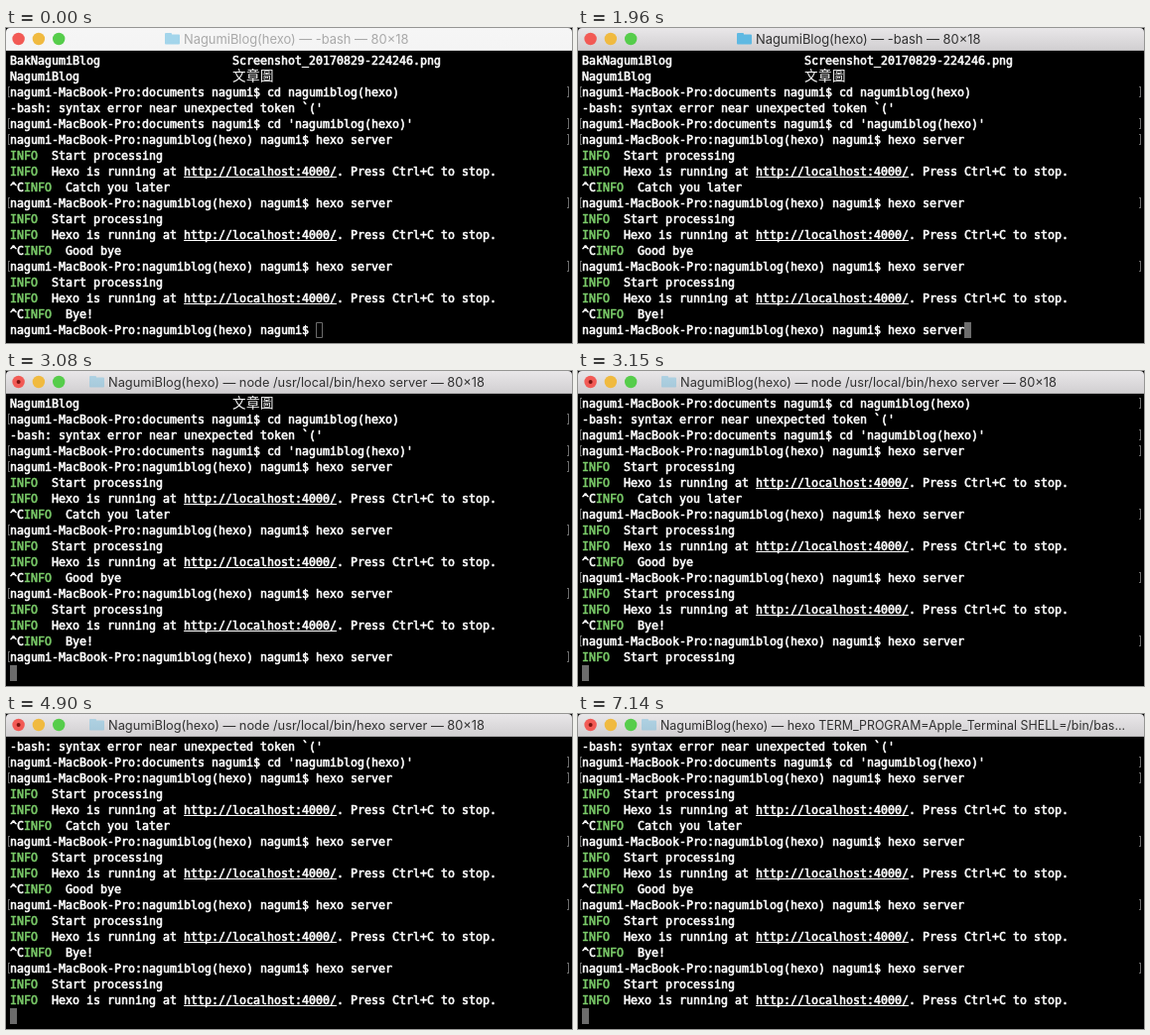
These frames come from a looping animation (570 px wide and 318 px high, 7.28 s). An HTML page with a canvas:

```html
<!DOCTYPE html>
<html lang="en">
<head>
<meta charset="utf-8">
<title>Terminal</title>
<style>
html, body { margin: 0; width: 100%; height: 100%; overflow: hidden; background: #000; }
canvas { display: block; width: 570px; height: 318px; }
</style>
</head>
<body>
<canvas id="stage" width="570" height="318"></canvas>
<script>
const ctx = document.getElementById('stage').getContext('2d');
const LOOP = 7280;
const CELL = 7, ROW = 16, LEFT = 4, TOP = 25, LAST_ROW = 17, BAR = 23;
const WHITE = '#fff', GREEN = '#7acb69', GREY = '#6c6c6c';
const MONO = '11.63px "DejaVu Sans Mono", monospace';
const CJK = '13.5px "Noto Sans CJK TC", "Noto Sans CJK", sans-serif';

// Log entries: prompts carry a path and a command, the rest is plain text
const prompt = (path, command) => ({ prompt: `nagumi-MacBook-Pro:${path} nagumi$ `, command });
const server = () => prompt('nagumiblog(hexo)', 'hexo server');
const start = 'INFO  Start processing';
const running = 'INFO  Hexo is running at http://localhost:4000/. Press Ctrl+C to stop.';
const session = bye => [server(), start, running, '^CINFO  ' + bye];
const log = [
  'BakNagumiBlog'.padEnd(32) + 'Screenshot_20170829-224246.png',
  'NagumiBlog'.padEnd(32) + '文章圖',
  prompt('documents', 'cd nagumiblog(hexo)'),
  "-bash: syntax error near unexpected token `('",
  prompt('documents', "cd 'nagumiblog(hexo)'"),
  ...session('Catch you later'),
  ...session('Good bye'),
  ...session('Bye!'),
  server(), start, running
];

// Timeline in ms; a busy window dims its folder and dots its close button
const FOCUS = 210, COMMAND = 1050;
const SCROLLS = [2030, 3150, 4900];
const folder = 'NagumiBlog(hexo) — ';
const titles = [
  { at: 0, busy: false, icon: 160, size: 12.9, text: folder + '-bash — 80×18' },
  { at: 2170, busy: true, icon: 84, size: 12.8, text: folder + 'node /usr/local/bin/hexo server — 80×18' },
  { at: 6160, busy: true, icon: 64, size: 12.4, text: folder + 'hexo TERM_PROGRAM=Apple_Terminal SHELL=/bin/bas...' }
];

function rect(x, y, w, h, color) {
  ctx.fillStyle = color;
  ctx.fillRect(x, y, w, h);
}

function disc(x, y, r, color) {
  ctx.fillStyle = color;
  ctx.beginPath();
  ctx.arc(x, y, r, 0, Math.PI * 2);
  ctx.fill();
}

function drawGlyphs(text, col, y, color) {
  ctx.fillStyle = ctx.strokeStyle = color;
  ctx.lineWidth = 0.6;
  ctx.lineJoin = 'round';
  let x = LEFT + col * CELL;
  for (const ch of text) {
    const wide = ch > '\u2fff';
    ctx.font = wide ? CJK : MONO;
    ctx.fillText(ch, x, y);
    if (!wide) ctx.strokeText(ch, x, y);
    x += wide ? CELL * 2 : CELL;
  }
}

function drawLine(text, row) {
  const y = TOP + row * ROW + 12;
  const info = text.indexOf('INFO');
  if (info < 0) {
    drawGlyphs(text, 0, y, WHITE);
  } else {
    drawGlyphs(text.slice(0, info), 0, y, WHITE);
    drawGlyphs('INFO', info, y, GREEN);
    drawGlyphs(text.slice(info + 4), info + 4, y, WHITE);
  }
  const url = text.match(/http\S+\//);
  if (url) rect(LEFT + url.index * CELL, y + 1, url[0].length * CELL, 1, WHITE);
}

function drawBrackets(row) {
  const y = TOP + row * ROW + 2;
  for (const [x, tip] of [[2, 2], [566, 565]]) {
    rect(x, y, 1, 11, GREY);
    rect(tip, y, 2, 1, GREY);
    rect(tip, y + 10, 2, 1, GREY);
  }
}

function drawCursor(col, focused) {
  const x = LEFT + col * CELL, y = TOP + LAST_ROW * ROW;
  if (focused) {
    rect(x, y, CELL, ROW, GREY);
  } else {
    ctx.strokeStyle = GREY;
    ctx.lineWidth = 1;
    ctx.strokeRect(x + 0.5, y + 0.5, CELL - 1, ROW - 1);
  }
}

function drawTerminal(t) {
  const top = SCROLLS.filter(at => t >= at).length;
  let cursor = 0;
  for (let row = 0; row <= LAST_ROW; row++) {
    const entry = log[top + row];
    const current = row === LAST_ROW;
    if (current && top > 0) break;
    if (typeof entry === 'string') {
      drawLine(entry, row);
    } else {
      const text = entry.prompt + (current && t < COMMAND ? '' : entry.command);
      drawLine(text, row);
      if (current) cursor = text.length;
      else drawBrackets(row);
    }
  }
  drawCursor(cursor, t >= FOCUS);
}

function drawFolder(x, alpha) {
  ctx.globalAlpha = alpha;
  ctx.fillStyle = '#5fb9e2';
  ctx.beginPath();
  ctx.roundRect(x, 5, 7, 5, 1);
  ctx.roundRect(x, 6.5, 15, 10, 1);
  ctx.fill();
  ctx.globalAlpha = 1;
}

function drawTitleBar(t) {
  const focused = t >= FOCUS;
  const title = titles.filter(item => t >= item.at).pop();
  const shade = ctx.createLinearGradient(0, 0, 0, BAR);
  shade.addColorStop(0, focused ? '#e9e7e9' : '#f6f6f6');
  shade.addColorStop(1, focused ? '#d0ced0' : '#f4f4f4');
  ctx.fillStyle = shade;
  ctx.beginPath();
  ctx.roundRect(0, 0, 570, BAR, [4, 4, 0, 0]);
  ctx.fill();
  rect(0, BAR - 1, 570, 1, focused ? '#b4b2b4' : '#d5d5d5');

  ['#f25a55', '#f0ba40', '#56cd4b'].forEach((color, i) => disc(12.6 + i * 20.3, 11, 6.2, color));
  if (title.busy) disc(12.6, 11, 2, '#7c120f');

  drawFolder(title.icon, !focused ? 0.55 : title.busy ? 0.4 : 1);
  ctx.font = `${title.size}px Inter, "Liberation Sans", sans-serif`;
  ctx.fillStyle = focused ? '#303030' : '#a9a9a9';
  ctx.fillText(title.text, title.icon + 19, 15.7);
}

function frame(now) {
  const t = now % LOOP;
  rect(0, 0, 570, 318, '#000');
  drawTerminal(t);
  drawTitleBar(t);
  requestAnimationFrame(frame);
}
frame(performance.now());
</script>
</body>
</html>
```
